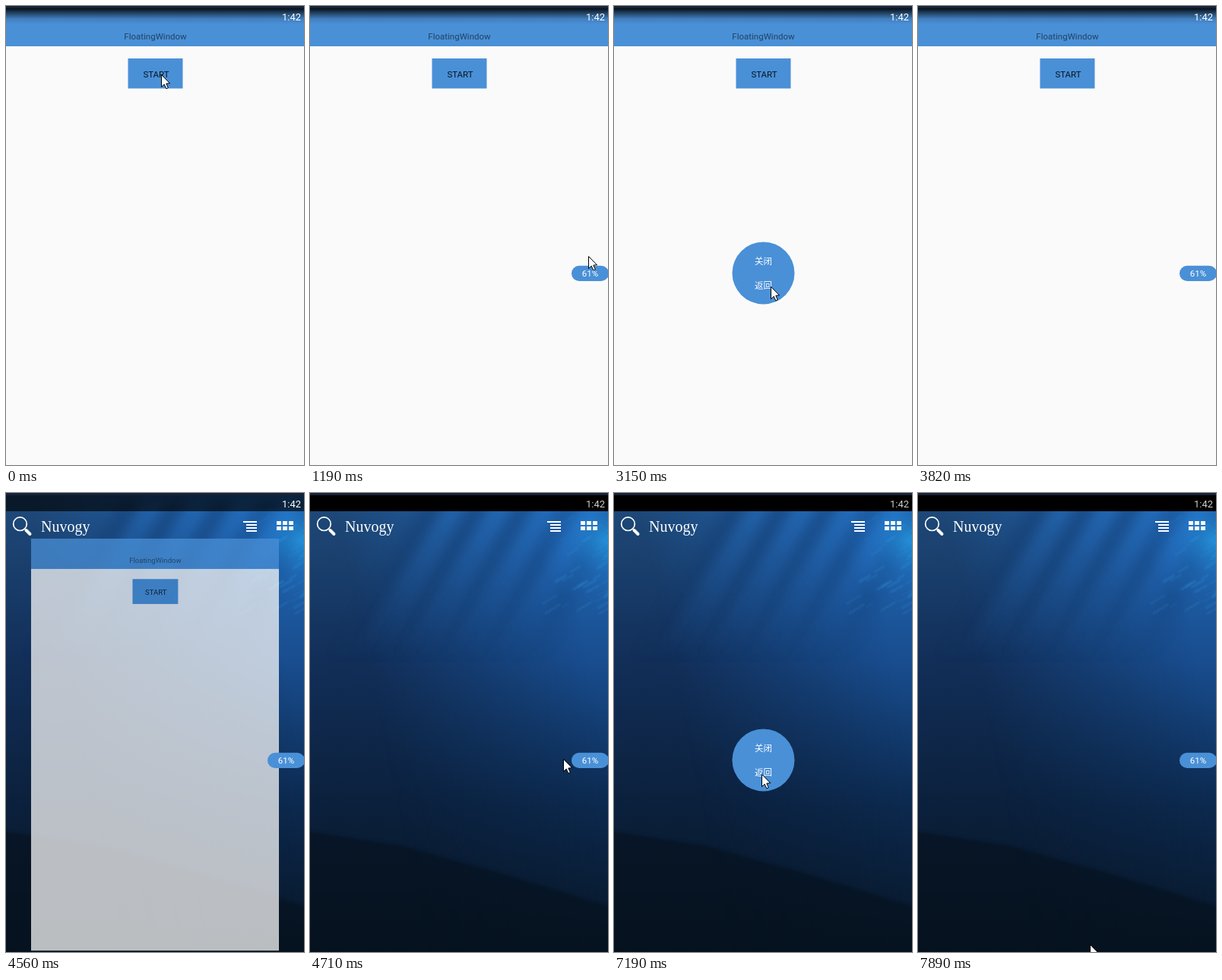
An HTML page with a canvas for the animation above (8 s loop, 392 by 604 pixels).

```html
<!DOCTYPE html>
<html lang="zh">
<head>
<meta charset="utf-8">
<title>FloatingWindow</title>
<style>
html, body { margin: 0; width: 100%; height: 100%; overflow: hidden; background: #fafafa; }
canvas { display: block; }
</style>
</head>
<body>
<canvas id="stage" width="392" height="604"></canvas>
<script>
const W = 392, H = 604, LOOP = 8000, STEP = 120;
const BLUE = '#4a90d7';
const UI = 'Roboto, "Noto Sans", sans-serif';
const CJK = '"Noto Sans CJK SC", "Noto Sans CJK", sans-serif';
const ctx = document.getElementById('stage').getContext('2d');

// pointer moves: start time, number of steps, where the tip ends up
const glides = [
  [0, 1, 204, 90], [500, 2, 196, 89], [770, 2, 287, 177], [1040, 2, 366, 329],
  [1340, 2, 368, 350], [2730, 2, 230, 357], [3000, 4, 198, 373],
  [4710, 1, 333, 350], [4860, 1, 325, 366], [5010, 2, 372, 349],
  [6650, 3, 202, 367], [7070, 2, 194, 370], [7470, 1, 190, 371],
  [7620, 2, 226, 505], [7890, 1, 226, 594]
];
const pointerHidden = t => t >= 3820 && t < 4710;

const widget = [
  [0, ''], [620, 'pill'], [2180, 'menu'], [3420, ''], [3540, 'pill'],
  [6250, 'menu'], [7470, ''], [7620, 'pill']
];
const screens = [[0, 'app'], [4560, 'closing'], [4710, 'home']];

const current = (list, t) => list.findLastIndex(item => item[0] <= t);
const stateAt = (list, t) => list[current(list, t)][1];

function pointerAt(t) {
  const i = current(glides, t);
  const [start, steps, x, y] = glides[i];
  const [, , x0, y0] = glides[Math.max(0, i - 1)];
  const done = Math.min(1, (1 + Math.floor((t - start) / STEP)) / steps);
  const k = 1 - (1 - done) ** 2;
  return [Math.round(x0 + (x - x0) * k), Math.round(y0 + (y - y0) * k)];
}

function rect(c, color, x, y, w, h) {
  c.fillStyle = color;
  c.fillRect(x, y, w, h);
}

function poly(c, color, pts) {
  c.fillStyle = color;
  c.beginPath();
  for (let i = 0; i < pts.length; i += 2) c.lineTo(pts[i], pts[i + 1]);
  c.closePath();
  c.fill();
}

function label(c, str, x, y, size, color, align = 'center', family = UI) {
  c.font = size + 'px ' + family;
  c.textAlign = align;
  c.fillStyle = color;
  c.fillText(str, x, y);
}

function ramp(gradient, ...colors) {
  colors.forEach((col, i) => gradient.addColorStop(i / (colors.length - 1), col));
  return gradient;
}
const vertical = (c, y0, y1, ...colors) =>
  ramp(c.createLinearGradient(0, y0, 0, y1), ...colors);

function layer() {
  const el = document.createElement('canvas');
  el.width = W;
  el.height = H;
  return el.getContext('2d');
}

function makeSea() {
  const c = layer(), lit = layer();
  let seed = 7;
  const rnd = () => (seed = seed * 16807 % 2147483647) / 2147483647;

  rect(c, vertical(c, 24, H, '#1e4878', '#122f59', '#0b203c', '#071422'), 0, 0, W, H);

  // brighter right-hand side fades in from the left
  rect(lit, vertical(lit, 24, H, '#2268b4', '#194e90', '#0c2a50', '#081626'), 0, 0, W, H);
  lit.globalCompositeOperation = 'destination-in';
  rect(lit, ramp(lit.createLinearGradient(40, 60, 320, 0), 'transparent', '#000'), 0, 0, W, H);
  c.drawImage(lit.canvas, 0, 0);

  // slanted shafts of light and shade, dying away with depth
  c.filter = 'blur(7px)';
  for (let i = 0; i < 9; i++) {
    const x = 150 + i * 30, tone = i % 2 ? '44,122,212' : '12,44,92';
    const fade = vertical(c, 24, 220, `rgba(${tone},.28)`, `rgba(${tone},0)`);
    poly(c, fade, [x, 10, x + 34, 10, x - 80, 220, x - 130, 220]);
  }

  // the darkest water, under a sloping edge
  c.filter = 'blur(2px)';
  poly(c, 'rgba(5,17,29,.6)', [-9, 444, 120, 464, 250, 500, 400, 546, 400, 620, -9, 620]);

  c.filter = 'none';
  const glow = c.createRadialGradient(388, 62, 0, 388, 62, 90);
  rect(c, ramp(glow, 'rgba(40,178,250,.6)', 'rgba(36,140,226,.22)', 'rgba(36,120,210,0)'),
    290, 20, 102, 140);

  // ripples near the light
  c.filter = 'blur(1px)';
  for (let i = 0; i < 50; i++) {
    const x = W - 110 * rnd() * rnd(), y = 40 + 120 * rnd(), len = 6 + 16 * rnd();
    c.strokeStyle = `rgba(60,176,244,${0.06 + 0.16 * rnd()})`;
    c.lineWidth = 1 + 2 * rnd();
    c.beginPath();
    c.moveTo(x, y);
    c.lineTo(x + len, y - len * 0.6);
    c.stroke();
  }
  return c.canvas;
}

function drawApp(c, top, bottom) {
  rect(c, '#fafafa', 0, top, W, bottom - top);
  rect(c, BLUE, 0, top, W, 53 - top);
  label(c, 'FloatingWindow', 196.5, 43.5, 11.5, 'rgba(0,0,0,.54)');
  rect(c, BLUE, 160.5, 69, 72, 39.5);
  label(c, 'START', 197.5, 93.5, 11.5, 'rgba(0,0,0,.87)');
}

// the shrunken app window, kept apart so that it fades as a whole
function makeClosing() {
  const c = layer();
  c.translate(33, 60);
  c.scale(326 / W, 326 / W);
  c.translate(0, -5);
  drawApp(c, 5, 657);
  return c.canvas;
}

const sea = makeSea(), closing = makeClosing();

function drawHome() {
  ctx.drawImage(sea, 0, 0);
  ctx.strokeStyle = '#fff';
  ctx.lineCap = 'round';
  ctx.lineWidth = 1.7;
  ctx.beginPath();
  ctx.arc(18.5, 40.7, 8.8, 0, 7);
  ctx.stroke();
  ctx.lineWidth = 4;
  ctx.beginPath();
  ctx.moveTo(26.5, 49);
  ctx.lineTo(31.5, 54);
  ctx.stroke();
  label(ctx, 'Nuvogy', 46, 51, 20, '#fff', 'left', '"Liberation Serif", serif');
  for (let i = 0; i < 4; i++) {
    const x = i ? 316 : 312;
    rect(ctx, '#fff', x, 37 + i * 4, 330 - x, 2);
  }
  for (let i = 0; i < 6; i++)
    rect(ctx, '#fff', 356 + i % 3 * 8, i < 3 ? 37 : 44, 6, 5);
}

function drawStatus(screen) {
  const shade = {
    app: vertical(ctx, 3, 24, 'rgba(0,0,0,.9)', 'rgba(0,0,0,.5)', 'rgba(0,0,0,.12)', 'transparent'),
    closing: 'rgba(0,0,0,.65)',
    home: '#000'
  };
  rect(ctx, shade[screen], 0, 3, W, 21);
  rect(ctx, '#17233a', 0, 0, W, 3);
  label(ctx, '1:42', 388, 18.5, 13, screen === 'home' ? '#cdcdcd' : '#fff', 'right');
}

function drawWidget(kind) {
  if (!kind) return;
  ctx.fillStyle = BLUE;
  ctx.beginPath();
  if (kind === 'pill') ctx.roundRect(344, 341.7, 49, 20.3, 10);
  else ctx.arc(196.5, 351.4, 41, 0, 7);
  ctx.fill();
  if (kind === 'pill') {
    label(ctx, '61%', 368.5, 356.3, 11.5, '#fff');
  } else {
    label(ctx, '关闭', 196.5, 339.5, 11.5, '#fff', 'center', CJK);
    label(ctx, '返回', 196.5, 372.3, 11.5, '#fff', 'center', CJK);
  }
}

function drawPointer(x, y) {
  ctx.save();
  ctx.translate(x + 0.5, y + 0.5);
  poly(ctx, '#fff', [0, 0, 0, 16, 3.7, 12.6, 6.3, 18.3, 8.8, 17.2, 6.3, 11.6, 11, 11.2]);
  ctx.strokeStyle = '#000';
  ctx.lineWidth = 1;
  ctx.stroke();
  ctx.restore();
}

function draw(t) {
  const screen = stateAt(screens, t);
  if (screen === 'app') drawApp(ctx, 3, H);
  else drawHome();
  if (screen === 'closing') {
    ctx.globalAlpha = 0.74;
    ctx.drawImage(closing, 0, 0);
    ctx.globalAlpha = 1;
  }
  drawStatus(screen);
  drawWidget(stateAt(widget, t));
  if (!pointerHidden(t)) drawPointer(...pointerAt(t));
}

const start = performance.now();
function tick(now) {
  draw(Math.max(0, now - start) % LOOP);
  requestAnimationFrame(tick);
}
draw(0);
requestAnimationFrame(tick);
</script>
</body>
</html>
```
